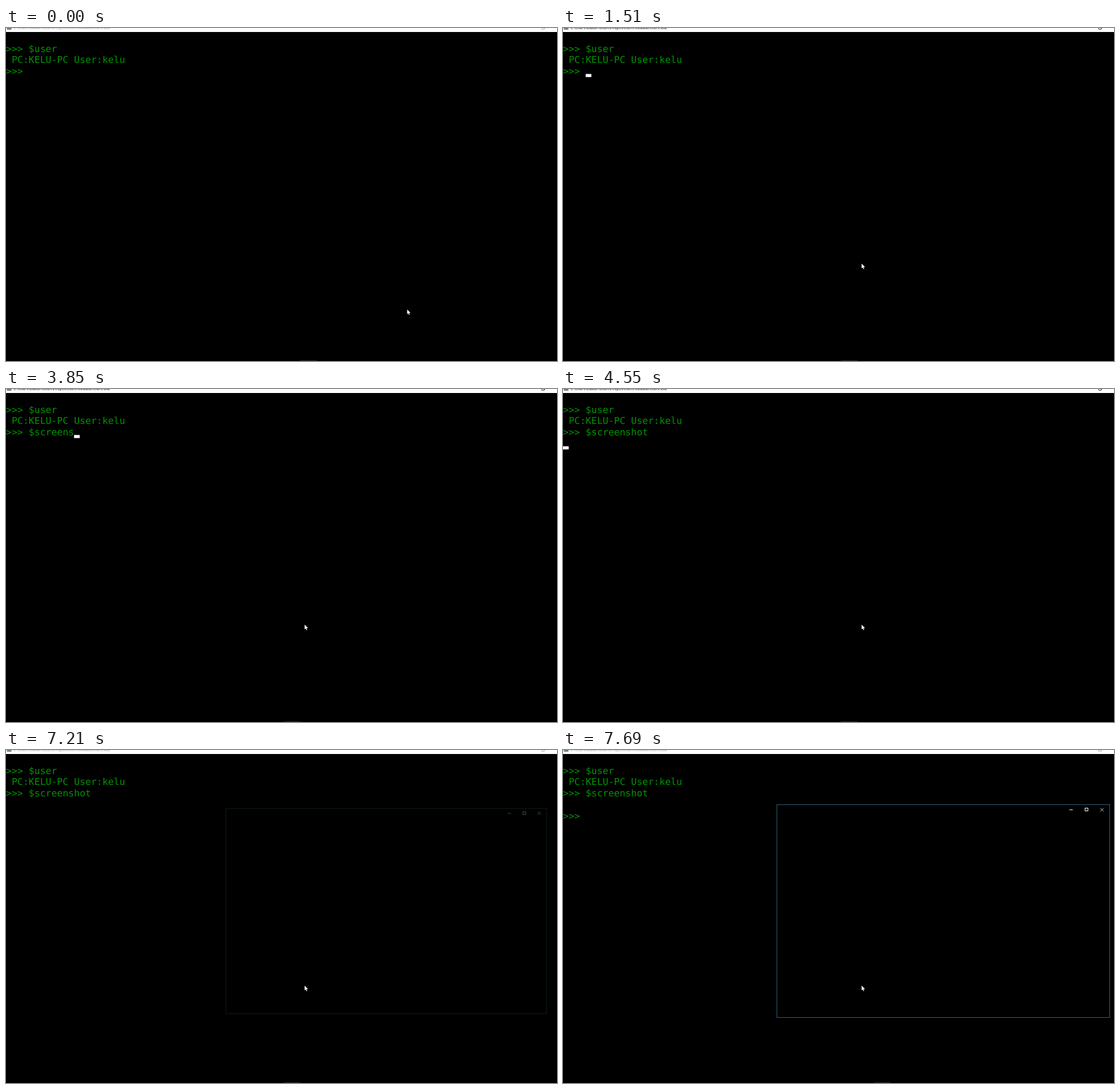
Write an HTML page that moves like this. It is 962 px wide and 582 px high and loops after 8000 ms.

```html
<!DOCTYPE html>
<html lang="en">
<head>
<meta charset="utf-8">
<title>Console session</title>
<style>
  html, body { margin: 0; width: 100%; height: 100%; overflow: hidden; background: #000; }
  svg { display: block; }
  text { white-space: pre; text-rendering: geometricPrecision; }
  .term { font: 16.45px "DejaVu Sans Mono", monospace; fill: #009400; }
  .title { font: 6.63px "Open Sans", "Noto Sans", sans-serif; }
</style>
</head>
<body>
<svg width="962" height="582" viewBox="0 0 962 582">
  <rect width="962" height="582"/>
  <rect width="962" height="7" fill="#fff"/>
  <rect x="1.5" width="8" height="3" fill="#6f8583"/>
  <text id="title" class="title" x="13.3" y="2.2">C:\Users\Dakun\source\repos\client\Release\client.exe</text>
  <path id="restore" d="M935.5 0V2.2H939.5V0M939.5 .6H941" fill="none" stroke-width=".8"/>
  <rect id="task" y="581" width="29" height="1" fill="#303030"/>

  <g id="term" class="term"></g>
  <rect id="caret" width="9.9" height="5.4" fill="#fff"/>

  <g id="win" fill="none" stroke="#fff">
    <rect x="373.5" y="95.5" width="581" height="372" fill="#000" stroke="#2f6279"/>
    <path d="M884 104.5H890"/>
    <rect x="911.5" y="101.5" width="5" height="5"/>
    <path d="M938 101.5L944 107.5M944 101.5L938 107.5" stroke-width=".8"/>
  </g>

  <path id="mouse" d="M0 0V8.2L1.9 6.6L3.2 9.6L4.5 9.1L3.2 6.1H5.9Z" fill="#fff"/>
</svg>
<script>
const LOOP = 8000, CELL = 9.9, LINE = 19.8, TOP = 41.55;
const COMMAND = "$screenshot", PROMPT = ">>> ";
const FOCUS = 980, BLUR = 7130, REPLY = 7610;

// one key press per character, then Enter
const keys = [1990, 2370, 2600, 2770, 3000, 3400, 3700, 3850, 4010, 4080, 4230, 4550];

const $ = id => document.getElementById(id);
const set = (el, attrs) => {
  for (const k in attrs) el.setAttribute(k, attrs[k]);
};
const clamp = v => Math.min(1, Math.max(0, v));
const mix = (a, b, p) => a + (b - a) * p;
const smooth = p => p * p * (3 - 2 * p);

// progress from 0 to 1 in n equal jumps, the first one at t0
const jumps = (t, t0, gap, n) => clamp((Math.floor((t - t0) / gap) + 1) / n);
const blinks = t => Math.floor((t - 940) / 530);

const rows = Array.from({ length: 5 }, (_, i) => {
  const row = document.createElementNS("http://www.w3.org/2000/svg", "text");
  set(row, { y: TOP + i * LINE });
  return $("term").appendChild(row);
});
rows[0].textContent = PROMPT + "$user";
rows[1].textContent = " PC:KELU-PC User:kelu";

function drawConsole(t, active) {
  const pressed = keys.filter(k => k <= t);
  const entered = pressed.length === keys.length;
  const lastKey = pressed.at(-1) ?? 1510;
  const lit = active && (blinks(t) - blinks(lastKey)) % 2 === 0;

  rows[2].textContent = PROMPT + COMMAND.slice(0, pressed.length);
  rows[4].textContent = t >= REPLY ? PROMPT : "";
  set($("caret"), {
    x: entered ? 0 : (PROMPT.length + pressed.length) * CELL,
    y: TOP + (entered ? 3 : 2) * LINE - .8,
    opacity: lit ? 1 : 0
  });
}

function drawPointer(t) {
  const sweep = smooth(jumps(t, 300, 75, 5));
  const back = jumps(t, 750, 80, 2);
  const x = mix(700.4, 493.4, sweep) + 28 * back;
  const y = mix(492, 411.8, sweep);
  set($("mouse"), { transform: `translate(${x} ${y})` });
}

function drawWindow(t) {
  const p = jumps(t, BLUR, 80, 5);
  const scale = 1 - .1 * (1 - p) ** 2;
  set($("win"), {
    transform: `translate(664 281.5) scale(${scale}) translate(-664 -281.5)`,
    opacity: p ** 1.3
  });
  set($("task"), { x: t < FOCUS ? 514 : p < 1 ? 485 : 543 });
}

function draw(t) {
  const active = t >= FOCUS && t < BLUR;
  const ink = active ? "#000" : "#999";
  set($("title"), { fill: ink });
  set($("restore"), { stroke: ink });
  drawConsole(t, active);
  drawPointer(t);
  drawWindow(t);
}

const start = performance.now();
function tick() {
  draw((performance.now() - start) % LOOP);
  requestAnimationFrame(tick);
}
tick();
</script>
</body>
</html>
```
